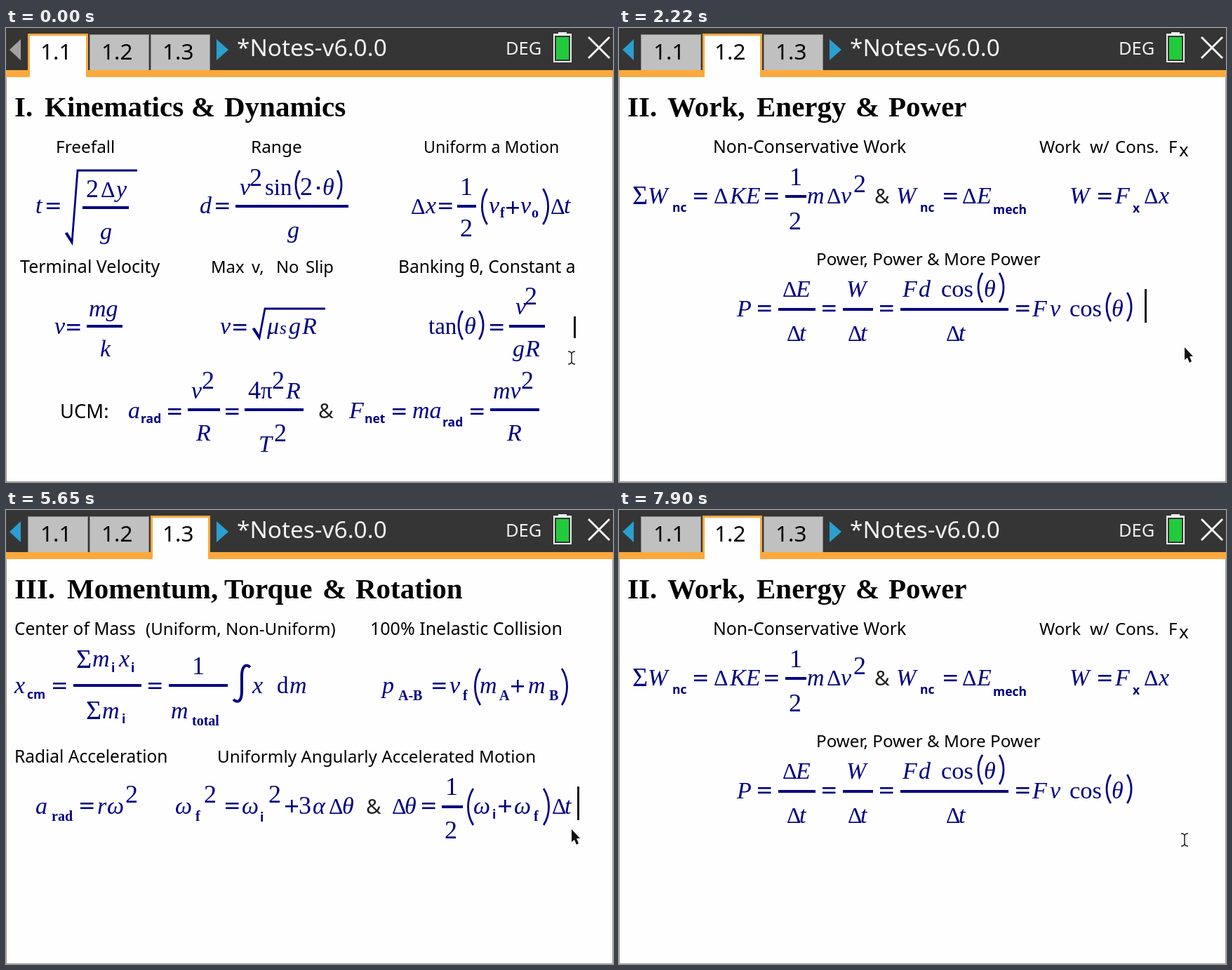
Animation of 865 by 647 pixels, one loop 8 s. Source, as an HTML page with a canvas:

```html
<!DOCTYPE html>
<html lang="en">
<head>
<meta charset="utf-8">
<title>Formula notes</title>
<style>
html, body { margin: 0; width: 100%; height: 100%; overflow: hidden; background: #fefefe; }
canvas { display: block; }
</style>
</head>
<body>
<canvas id="stage" width="865" height="647"></canvas>
<script>
const c = document.getElementById('stage').getContext('2d');
const NAVY = '#000080', ORANGE = '#fba93d', BLUE = '#2a9fd0';
const SANS = '"Noto Sans", sans-serif', SERIF = '"Liberation Serif", serif';

// Places text so that its ink starts at x.
function ink(s, x, y, font, color) {
  c.font = font;
  c.fillStyle = color;
  c.fillText(s, x + c.measureText(s).actualBoundingBoxLeft, y);
}
// Items come as text, x pairs on one baseline.
function row(font, color, y, items) {
  for (let i = 0; i < items.length; i += 2) ink(items[i], items[i + 1], y, font, color);
}
const head = (...a) => row('bold 41px ' + SERIF, '#000', 126, a);
const label = (y, size, ...a) => row(size + 'px ' + SANS, '#000', y, a);
const it = (y, ...a) => row('italic 34px ' + SERIF, NAVY, y, a);
const up = (y, ...a) => row('33px ' + SERIF, NAVY, y, a);
const delta = (y, ...xs) => xs.forEach(x => ink('Δ', x, y, '32px ' + SERIF, NAVY));
const sigma = (y, x) => ink('Σ', x, y, '38px ' + SERIF, NAVY);
const num = (y, ...a) => row('36px ' + SERIF, NAVY, y, a);
const sub = (y, ...a) => row('bold 17.5px ' + SANS, NAVY, y, a);
const subSerif = (y, ...a) => row('bold 20px ' + SERIF, NAVY, y, a);
const amp = (x, y) => ink('&', x, y, '29.5px ' + SANS, '#222');

function rect(x, y, w, h, color = NAVY) {
  c.fillStyle = color;
  c.fillRect(x, y, w, h);
}
const bar = (x1, x2, y) => rect(x1, y - 2, x2 - x1, 4);
function eq(y, ...xs) {
  for (const x of xs) {
    rect(x, y - 5, 18.5, 2.6);
    rect(x, y + 1.5, 18.5, 2.6);
  }
}
function plus(x, y) {
  rect(x, y - 1, 18, 2.6);
  rect(x + 8, y - 9, 2.6, 18);
}
function stroke(width, color, draw) {
  c.lineWidth = width;
  c.strokeStyle = color;
  c.beginPath();
  draw();
  c.stroke();
}
function poly(points, color, width) {
  c.beginPath();
  points.forEach(([x, y]) => c.lineTo(x, y));
  if (width) {
    c.lineWidth = width;
    c.strokeStyle = color;
    c.stroke();
  } else {
    c.fillStyle = color;
    c.fill();
  }
}
function arc(x, tip, y1, y2) {
  const h = (y2 - y1) * 0.3;
  stroke(2.8, NAVY, () => {
    c.moveTo(tip, y1);
    c.bezierCurveTo(x, y1 + h, x, y2 - h, tip, y2);
  });
}
function parens(l, r, y1, y2) {
  const d = (y2 - y1) * 0.19;
  arc(l, l + d, y1, y2);
  arc(r, r - d, y1, y2);
}
function root(x, y, top, rise, end) {
  poly([[x - 1, y - 14], [x + 8, y], [x + rise, top], [end, top]], NAVY, 2.8);
  poly([[x, y - 14], [x + 8, y - 1]], NAVY, 3.5);
}

function kinematics() {
  head('I.', 13, 'Kinematics', 55, '&', 266, 'Dynamics', 311);
  label(178, 24.4, 'Freefall', 73, 'Range', 351);
  label(178, 23.2, 'Uniform a Motion', 597);
  label(349, 25, 'Terminal Velocity', 20);
  label(349, 23.8, 'Max', 294, 'v,', 350, 'No', 387, 'Slip', 428);
  label(349, 24.6, 'Banking θ, Constant a', 561);

  it(264, 't', 43);
  eq(254, 58);
  root(86, 306, 203, 16, 187);
  num(241, '2', 115);
  delta(241, 136);
  it(241, 'y', 154);
  bar(109, 175, 256);
  it(301, 'g', 134);

  it(264, 'd', 277);
  eq(254, 299);
  it(238, 'v', 333, 'θ', 452);
  num(225, '2', 348);
  up(238, 'sin', 370);
  num(238, '2', 420);
  rect(443, 226, 4, 4);
  parens(411, 480, 203, 244);
  bar(327, 488, 254);
  it(299, 'g', 401);

  delta(265, 578, 777);
  it(264, 'x', 597, 'v', 688, 'v', 733, 't', 796);
  eq(254, 617);
  num(238, '1', 650);
  bar(643, 670, 254);
  num(297, '2', 648);
  subSerif(270, 'f', 704, 'o', 749);
  plus(713, 256);
  parens(676, 775, 229, 280);

  it(436, 'v', 69);
  eq(427, 87);
  it(411, 'mg', 119);
  bar(115, 166, 425);
  it(468, 'k', 134);

  it(436, 'v', 305, 'μ', 371, 'g', 403, 'R', 421);
  ink('s', 390, 436, 'italic 25px ' + SERIF, NAVY);
  eq(427, 324);
  root(353, 442, 400, 16, 455);

  up(436, 'tan', 602);
  it(436, 'θ', 654);
  parens(643, 682, 403, 444);
  eq(427, 690);
  it(408, 'v', 726);
  num(394, '2', 740);
  bar(717, 768, 425);
  it(468, 'g', 722, 'R', 739);

  label(556, 27.4, 'UCM:', 79);
  amp(446, 556);
  it(556, 'a', 175, 'F', 488, 'ma', 580);
  sub(563, 'rad', 193, 'net', 512);
  sub(568, 'rad', 623);
  eq(547, 231, 313, 551, 662);
  bar(259, 305, 544);
  bar(340, 424, 544);
  bar(690, 760, 544);
  it(528, 'v', 264, 'R', 398, 'mv', 695);
  num(528, '4', 345);
  up(528, 'π', 363);
  num(514, '2', 280, '2', 380, '2', 735);
  it(588, 'R', 270, 'R', 713);
  it(604, 'T', 362);
  num(589, '2', 383);
}

function energy() {
  head('II.', 13, 'Work,', 69, 'Energy', 196, '&', 339, 'Power', 384);
  label(178, 24.8, 'Non-Conservative Work', 136);
  label(178, 24, 'Work', 599, 'w/', 671, 'Cons.', 708, 'F', 785);
  label(183, 26, 'x', 798);
  label(338, 24.2, 'Power, Power & More Power', 283);

  sigma(251, 20);
  it(250, 'W', 43, 'KE', 157, 'm', 269, 'v', 316, 'W', 397, 'E', 509, 'W', 644, 'F', 706, 'x', 768);
  delta(250, 136, 297, 490, 749);
  sub(262, 'nc', 77, 'nc', 430);
  sub(265, 'mech', 534);
  sub(263, 'x', 732);
  eq(240, 107, 208, 463, 683);
  num(224, '1', 246);
  bar(237, 267, 240);
  num(287, '2', 243);
  num(234, '2', 335);
  amp(365, 250);

  it(411, 'P', 167, 'F', 588, 'v', 614, 'θ', 703);
  eq(400, 198, 290, 372, 566);
  delta(383, 234);
  it(383, 'E', 251, 'W', 326, 'F', 403, 'd', 428, 'θ', 521);
  bar(227, 280, 401);
  bar(319, 362, 401);
  bar(401, 555, 401);
  delta(446, 240, 327, 467);
  it(446, 't', 258, 't', 345, 't', 485);
  const cos = (x, y) => ink('cos', x, y, '34.5px ' + SERIF, NAVY);
  cos(460, 383);
  cos(643, 411);
  parens(510, 550, 349, 391);
  parens(693, 732, 377, 418);
}

function rotation() {
  head('III.', 13, 'Momentum,', 87, 'Torque', 311, '&', 453, 'Rotation', 498);
  label(178, 24.5, 'Center of Mass', 13);
  label(178, 24.1, '(Uniform, Non-Uniform)', 199);
  label(178, 25, '100% Inelastic Collision', 521);
  label(360, 24.5, 'Radial Acceleration', 14);
  label(360, 24.2, 'Uniformly Angularly Accelerated Motion', 303);

  it(261, 'x', 11, 'x', 350, 'm', 405, 'p', 534, 'v', 632, 'm', 676, 'm', 745);
  up(261, 'd', 387);
  sub(269, 'cm', 30);
  eq(251, 67, 203, 608);
  sigma(225, 101);
  it(223, 'm', 124, 'x', 160);
  sub(231, 'i', 151, 'i', 179);
  bar(96, 193, 250);
  sigma(298, 115);
  it(297, 'm', 138, 'm', 236);
  sub(304, 'i', 166);
  num(234, '1', 268);
  bar(232, 316, 250);
  subSerif(307, 'total', 265);
  stroke(4, NAVY, () => {
    c.moveTo(348, 224);
    c.bezierCurveTo(340, 217, 336, 226, 336, 236);
    c.lineTo(336, 258);
    c.bezierCurveTo(336, 270, 332, 277, 324, 270);
  });
  subSerif(271, 'A-B', 559, 'f', 651, 'A', 703, 'B', 774);
  plus(720, 251);
  parens(666, 802, 226, 278);

  it(433, 'a', 43, 'r', 131, 'ω', 145, 'ω', 242, 'ω', 337, 'α', 438, 'θ', 480, 'θ', 569);
  it(433, 'ω', 667, 'ω', 725, 't', 797);
  delta(433, 461, 551, 779);
  subSerif(443, 'rad', 65, 'f', 270, 'f', 752);
  sub(444, 'i', 363);
  sub(440, 'i', 694);
  eq(422, 106, 313, 593);
  num(417, '2', 171, '2', 283, '2', 375);
  num(433, '3', 418);
  plus(398, 422);
  plus(702, 422);
  amp(514, 433);
  num(406, '1', 629);
  bar(621, 651, 423);
  num(468, '2', 626);
  parens(656, 776, 397, 449);
}

function header(page) {
  rect(0, 0, 865, 61, '#353535');
  rect(0, 60, 865, 10, ORANGE);
  poly([[21, 16], [21, 46], [5, 31]], page ? BLUE : '#a3a3a3');
  poly([[300, 16], [300, 46], [317, 31]], BLUE);
  for (let i = 0; i < 3; i++) {
    const x = [31, 119, 206][i], w = [86, 85, 85][i];
    if (i === page) {
      rect(x, 8, w, 62, ORANGE);
      rect(x + 3, 11, w - 6, 60, '#fefefe');
    } else {
      rect(x, 9, w, 51, '#8c8c8c');
      rect(x + 1, 10, w - 2, 50, '#c0c0c0');
    }
    ink('1.' + (i + 1), [51, 138, 225][i], 45, '31.5px ' + SANS, '#000');
  }
  ink('*Notes-v6.0.0', 330, 40, '33.4px ' + SANS, '#f2f2f2');
  ink('DEG', 714, 38, '25.5px ' + SANS, '#eee');
  rect(787, 6, 12, 4, '#eee');
  rect(780, 8, 26, 41, '#eee');
  rect(782, 11, 22, 36, '#353535');
  rect(784, 13, 18, 32, '#22cb3c');
  poly([[830, 13], [860, 43]], '#f2f2f2', 3);
  poly([[860, 13], [830, 43]], '#f2f2f2', 3);
}

function beam() {
  stroke(1.5, '#222', () => {
    c.moveTo(801, 461);
    c.quadraticCurveTo(806, 461, 806, 465);
    c.quadraticCurveTo(806, 461, 811, 461);
    c.moveTo(806, 464);
    c.lineTo(806, 475);
    c.moveTo(801, 479);
    c.quadraticCurveTo(806, 479, 806, 475);
    c.quadraticCurveTo(806, 479, 811, 479);
  });
}
function arrow() {
  poly([[806, 455], [806, 473], [810, 470], [813, 477], [816, 475], [813, 468], [818, 468]], '#111');
}

const pages = [kinematics, energy, rotation];
const carets = [[809, 411, 31], [749, 372, 48], [814, 394, 48]];
const turns = [[0, 0], [400, 1], [3890, 2], [7520, 1]];
const blinks = [680, 1190, 1700, 2220, 2760, 3160, 3750, 3890, 4160, 4700, 5150, 5650, 6180, 6720, 7120, 7520, 7900];

function draw(t) {
  const page = turns.filter(v => v[0] <= t).pop()[1];
  const caret = blinks.filter(v => v <= t).length % 2 === 0;
  rect(0, 0, 865, 647, '#fefefe');
  header(page);
  pages[page]();
  rect(0, 70, 1, 577, '#9a9a9a');
  rect(864, 70, 1, 577, '#9a9a9a');
  rect(0, 646, 865, 1, '#9a9a9a');
  if (caret) {
    const [x, y, h] = carets[page];
    rect(x, y, 3, h, '#111');
  }
  (t < 400 || t >= 7520 ? beam : arrow)();
}

const start = performance.now();
function tick() {
  draw((performance.now() - start) % 8000);
  requestAnimationFrame(tick);
}
tick();
</script>
</body>
</html>
```
